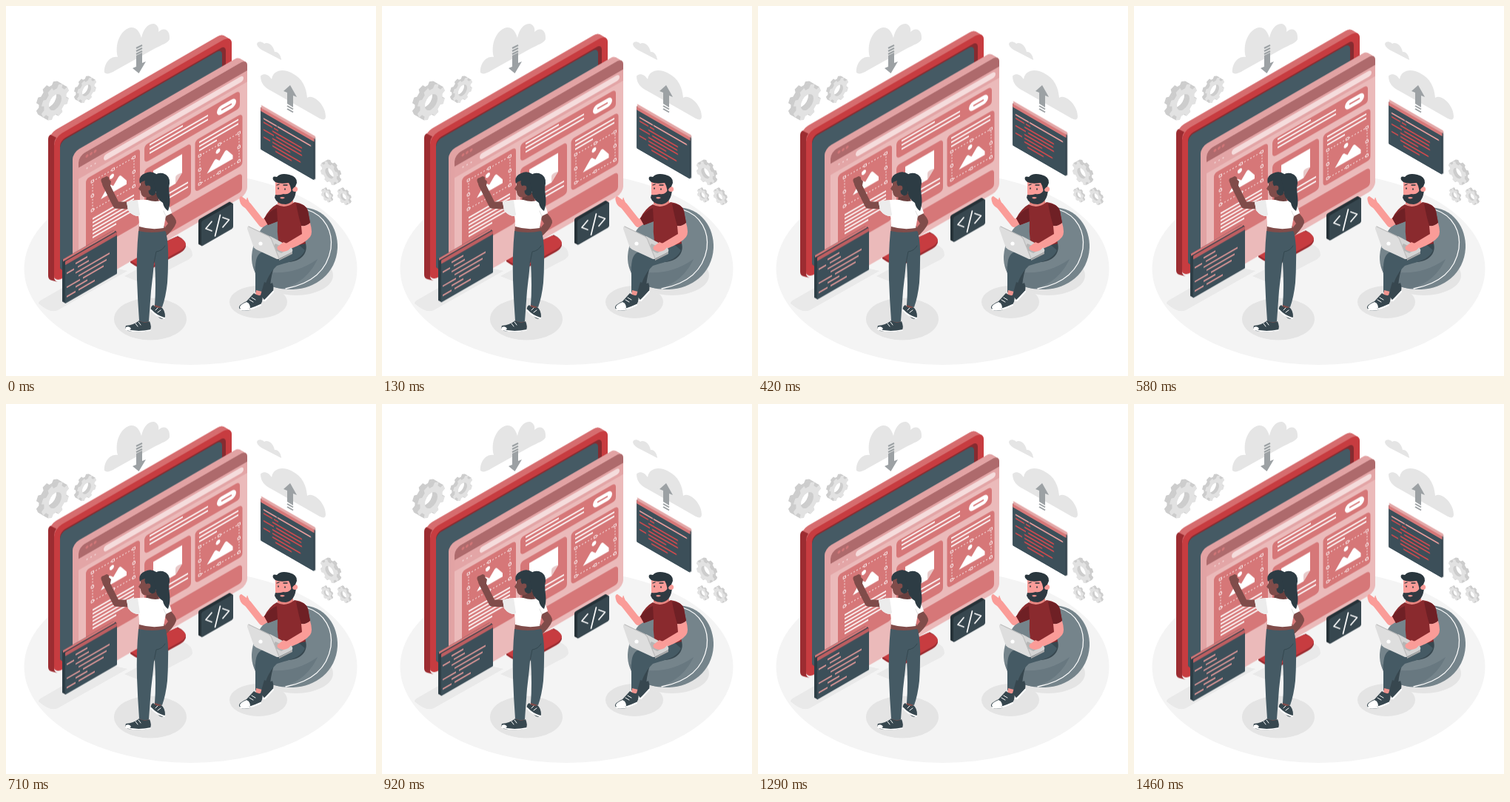
These frames come from a looping animation (500 by 500 pixels, 1.5 s). An HTML page:

```html
<!DOCTYPE html>
<html lang="en">
<head>
<meta charset="utf-8">
<title>Web builders</title>
<style>
html, body { margin: 0; width: 100%; height: 100%; overflow: hidden; background: #fff; }
svg { display: block; width: 100vw; height: 100vh; }
</style>
</head>
<body>
<svg id="stage" viewBox="0 0 500 500" fill="none" stroke-linecap="round" stroke-linejoin="round">
  <ellipse cx="249.500" cy="355" rx="225" ry="130" fill="#f4f4f4"/>
  <g fill="#e4e4e4">
    <path d="M44 402Q44 399 50 396L130 350L164 358L70 411Q60 416 44 402Z" fill="#e9e9e9"/>
    <path d="M160 365L240 322Q252 326 252 337Q250 342 240 346L185 375Z" fill="#e9e9e9"/>
    <ellipse cx="195" cy="423" rx="49" ry="28.500"/>
    <ellipse cx="341" cy="400" rx="39" ry="22"/>
    <ellipse cx="392" cy="364" rx="50" ry="27"/>
  </g>

  <g id="clouds" fill="#e5e5e5">
    <path d="M133 90C132 79 140 67 151 69C146 50 156 31 169 29C178 29 181 37 183 43C185 33 191 23 200 24C205 26 207 30 206 35C215 27 222 34 221 45C219 50 211 52 200 58L148 87Q137 94 133 90Z"/>
    <path d="M344 95C347 90 355 92 359 99C361 86 375 84 387 91C401 98 406 111 407 124C416 118 432 135 432 149Q432 156 424 152L359 115Q344 108 344 95Z"/>
    <path d="M339 51C341 47 346 48 349 51C353 48 361 52 363 62C368 61 372 68 372 73L345 59Q339 55 339 51Z"/>
  </g>
  <g fill="#9ca1a4">
    <path d="M176 67L184 63V77L189 75L179.500 91L171 84L176 82Z"/>
    <path d="M384 107L393 123L388 121V137L380 132V117L375 115Z"/>
  </g>
  <path d="M176 57L184 53M176 61L184 57M176 65L184 61M380 135L388 139.500M380 139L388 143.500" stroke="#9ca1a4" stroke-width="2" stroke-linecap="butt"/>
  <g id="gears"></g>
  <g id="float"></g>

  <g id="man">
    <path d="M398 272C432 272 449 300 448 327C446 362 418 382 388 383C352 384 331 366 332 338C334 305 362 272 398 272Z" fill="#75848b"/>
    <path d="M334 350C348 364 388 366 421 342C411 364 394 377 373 382C350 379 336 368 334 350Z" fill="#687880"/>
    <path d="M406 275C432 283 442 306 439 328C434 357 414 375 378 382" stroke="#fff" stroke-width="1.300"/>

    <path d="M404 318C410 332 400 345 382 346L364 349Q358 362 357 380L347 379C345 362 340 350 347 340L372 326Z" fill="#37474f"/>
    <path d="M390 318L345 333C336 338 337 352 337 364L337 387L347 389C350 376 354 362 366 351C384 345 398 344 404 330Z" fill="#455a64"/>
    <path d="M338 384L346 386L344 394L337 392ZM350 376L357 378L356 384L349 382Z" fill="#f0938e"/>
    <path d="M349 373Q356 377 360 374Q363 382 360 387L349 397L344 391Z" fill="#37474f"/>
    <path d="M361 386L350 398L346 398" stroke="#fff" stroke-width="2"/>
    <path d="M335 388Q341 393 346 390Q348 400 343 404L329 411Q318 414 315 408Q314 404 325 399Z" fill="#37474f"/>
    <path d="M325 400Q330 402 330 408Q320 413 316 408Q315 404 325 400Z" fill="#fff"/>
    <path d="M317 410Q325 413 344 404" stroke="#fff" stroke-width="2"/>
    <path d="M329 397L334 400M332 394L337 397" stroke="#fff" stroke-width="1"/>

    <path d="M366 281L346 294L327 270" stroke="#fa9c98" stroke-width="9.500"/>
    <path d="M331 270L327 261Q326 256 325 262L318 257Q314 258 316 264Q317 270 325 274Z" fill="#fa9c98"/>
    <path d="M367 256L386 256L389 268Q377 276 367 268Z" fill="#e88580"/>
    <path d="M366 268Q377 275 390 265Q405 267 408 277L411 293Q405 298 399 297L405 321Q385 327 368 318Q366 305 367 291L354 296L349 287Q356 273 366 268Z" fill="#8a2a2e"/>
    <path d="M392 267Q405 267 408 277L411 293Q405 298 399 297Q395 284 392 267ZM366 273L367 291L354 296L349 287Q357 276 366 273Z" fill="#6f2025"/>
    <path d="M399 297Q406 298 411 293Q415 307 411 312Q405 320 385 328L375 333Q366 331 366 326L380 320L400 308Z" fill="#fa9c98"/>
    <path d="M364 236Q374 228 388 237L389 255Q385 266 374 266Q365 264 364 254Z" fill="#fa9c98"/>
    <path d="M364 255Q369 256 375 254Q384 256 387 246L392 248Q391 266 378 268Q366 268 363 259Z" fill="#2f3a42"/>
    <path d="M370 259Q373 257 377 259Q373 262 370 259Z" fill="#f0938e"/>
    <circle cx="390.500" cy="247.500" r="3.600" fill="#fa9c98"/>
    <path d="M361 235Q359 229 366 231Q371 225 383 228Q394 231 393 239L391 244Q387 246 386 251L384 243L382 239Q370 241 364 238Z" fill="#2a373e"/>
    <path d="M366 242L369 241M375 242L380 242" stroke="#263238" stroke-width="1.300"/>
    <path d="M368 246v1M377 247v1" stroke="#263238" stroke-width="1.600"/>

    <path d="M357 311L385 326Q389 330 386 333L368 342L334 326Z" fill="#d4d4d4"/>
    <path d="M364 321L381 329L372 334L360 328Z" fill="#b5b5b5"/>
    <path d="M369 342L387 332V335L369 344Z" fill="#a9a9a9"/>
    <path d="M375 319L386 324Q384 331 374 332Q364 330 367 325Z" fill="#fa9c98"/>
    <path d="M328 298L355 311Q358 313 359 316L369 341Q367 343 364 341L338 329Q335 327 334 324L326 301Q326 297 328 298Z" fill="#dedede"/>
    <path d="M328 298L355 311Q358 313 359 316L369 341" stroke="#bdbdbd" stroke-width="1.200"/>
    <circle cx="344" cy="321" r="2.600" fill="#fff"/>
  </g>

  <g id="woman">
    <path d="M219 276Q231 287 230 293Q227 302 213 314L207 309L219 294L212 283Z" fill="#804c4a"/>
    <path d="M201 403L210 406L207 414L200 411Z" fill="#804c4a"/>
    <path d="M199 404Q204 410 210 407Q215 411 215 420Q213 424 208 422L196 411Q195 406 199 404Z" fill="#37474f"/>
    <path d="M196 411Q203 419 214 422" stroke="#fff" stroke-width="2"/>
    <path d="M202 411L205 408M205 414L209 411" stroke="#fff" stroke-width="1"/>
    <path d="M181 421H193L192 431H181Z" fill="#804c4a"/>
    <path d="M180 425Q187 430 194 426Q197 433 195 438Q183 442 165 439Q160 436 162 432Q173 431 180 425Z" fill="#37474f"/>
    <path d="M162 437Q176 442 195 438" stroke="#fff" stroke-width="1.600"/>
    <path d="M162 434Q167 432 169 436L167 438L162 437Z" fill="#fff"/>
    <path d="M175 429L178 433M179 427L182 431" stroke="#fff" stroke-width="1"/>
    <path d="M180 295L214 297L216 309L179 308Z" fill="#804c4a"/>
    <path d="M190 308L216 305Q220 322 219 347Q219 360 218 374Q216 393 211 407L201 404Q203 380 201 345Z" fill="#455a64"/>
    <path d="M179 304Q197 308 215 304Q219 318 217 333L201 338Q199 360 196 385L193 426Q187 429 180 425Q178 399 177 370Q176 335 179 304Z" fill="#455a64"/>
    <path d="M215 324Q211 331 203 332L200 347" stroke="#344850" stroke-width="1"/>
    <path d="M190 252L205 252L207 267H189Z" fill="#6a403f"/>
    <path d="M176 270L149 269L135 241" stroke="#804c4a" stroke-width="9.500"/>
    <path d="M129 238Q127 233 132 232L136 230Q140 231 139 234L142 237Q141 243 140 246L133 247Z" fill="#804c4a"/>
    <path d="M163 265Q176 261 191 262Q203 266 211 262Q221 266 224 280L216 284L213 300Q196 303 180 298Q180 289 179 284Q171 284 165 276Z" fill="#fff"/>
    <path d="M163 265Q171 262 178 263L181 282L179 284Q171 284 165 276Z" fill="#ececec"/>
    <path d="M216 284L213 277" stroke="#dedede" stroke-width="1"/>
    <path d="M182 237Q190 229 198 235L199 253Q196 260 186 258Q182 255 182 250L179 247L182 242Z" fill="#804c4a"/>
    <path d="M181 240Q178 230 188 226Q196 222 203 227Q208 235 205 245L201 255Q196 258 193 253L192 246Q186 241 188 236Q183 237 181 240Z" fill="#2d3c44"/>
    <circle cx="192" cy="246" r="3.400" fill="#804c4a"/>
    <path d="M199 233Q202 224 212 226Q222 229 221 240C218 252 225 262 219 277Q213 273 212 266Q202 260 202 247Z" fill="#2d3c44"/>
  </g>
</svg>
<script>
const $ = id => document.getElementById(id);
const RED = '#c73c40', CARD = '#d67778', DARK = '#3c4f59';

const rect = (x, y, w, h, r, fill) =>
  `<rect x="${x}" y="${y}" width="${w}" height="${h}" rx="${r}" fill="${fill}"/>`;
const line = (x, y, w, color = '#fff', width = 2) =>
  `<path d="M${x} ${y}h${w}" stroke="${color}" stroke-width="${width}" stroke-linecap="butt"/>`;
// Wall planes: x stays on screen, y is sheared along x.
const leftWall = s => `<g transform="matrix(1 -.577 0 1 0 56.500)">${s}</g>`;
const rightWall = s => `<g transform="matrix(1 .577 0 1 0 -198.500)">${s}</g>`;

function slab(x, y, w, h, r, front, side, depth, dir = -1) {
  let s = '';
  for (let d = depth; d > 0; d -= .5) s += rect(x + dir * d, y - 1.15 * d, w, h, r, side);
  return s + rect(x, y, w, h, r, front);
}

function picture(x, y, w, h) {
  let s = `<rect x="${x}" y="${y}" width="${w}" height="${h}" stroke="#fff" stroke-width=".8" stroke-dasharray="2 2" stroke-linecap="butt"/>`;
  for (let i = 0; i < 9; i++) {
    if (i === 4) continue;
    s += `<rect x="${x + w * (i % 3) / 2 - 1.500}" y="${y + h * (i / 3 | 0) / 2 - 1.500}" width="3" height="3" fill="${CARD}" stroke="#fff" stroke-width=".7"/>`;
  }
  const cx = x + w / 2, cy = y + h / 2;
  return s + `<circle cx="${cx - 2}" cy="${cy - 11}" r="3" fill="#fff"/>
    <path d="M${cx - 17} ${cy + 11}L${cx - 7} ${cy - 1}Q${cx - 5} ${cy - 3} ${cx - 3} ${cy}L${cx} ${cy + 3}L${cx + 7} ${cy - 5}Q${cx + 9} ${cy - 7} ${cx + 11} ${cy - 4}L${cx + 18} ${cy + 6}V${cy + 11}Z" fill="#fff"/>`;
}

function gear(cx, cy, R, dir, depth) {
  const teeth = 8, pts = [];
  for (let i = 0; i < teeth; i++)
    [[-.3, .8], [-.2, 1], [.2, 1], [.3, .8]].forEach(([o, k]) => {
      const a = (i + o) / teeth * 2 * Math.PI + .4;
      pts.push([R * k * Math.cos(a), R * k * Math.sin(a)].map(n => n.toFixed(1)));
    });
  const h = R * .45;
  const d = `M${pts.join('L')}ZM${h} 0A${h} ${h} 0 1 0 ${-h} 0A${h} ${h} 0 1 0 ${h} 0Z`;
  let s = '';
  for (let k = depth; k >= 0; k -= .5)
    s += `<path d="${d}" fill-rule="evenodd" fill="${k ? '#cdcdcd' : '#e2e2e2'}" transform="matrix(.866 ${.5 * dir} 0 1 ${cx + dir * k} ${cy - .577 * k})"/>`;
  return s;
}

function monitor() {
  const stand = `<path d="M168 342L232 311Q243 316 243 325Q242 330 235 334L197 355Q184 359 168 347Z" fill="#9c2c31"/>
    <path d="M168 339L230 312Q242 315 243 322Q242 327 235 331L197 352Q184 356 168 344Z" fill="${RED}"/>`;
  return stand
    + leftWall(slab(65, 159, 240, 196.500, 11, RED, '#d66d6f', 8))
    + '<path d="M57 180Q57 176 60 174L68 178Q65 182 65 187V368Q66 372 70 373L62 371Q57 370 57 365Z" fill="#9c2c31"/>'
    + leftWall(rect(73, 168, 224, 177, 7, '#862b30') + rect(73, 170, 219, 175, 7, '#455a64'));
}

function browser() {
  const clip = '<clipPath id="page"><rect x="98" y="203" width="228" height="183" rx="9"/></clipPath>';
  let s = clip + slab(98, 203, 228, 183, 9, '#ebbaba', '#e2a3a4', 8);
  s += `<g clip-path="url(#page)">${rect(98, 203, 228, 16, 0, '#ae6a6c')}${rect(98, 219, 228, 15, 0, '#e3a5a6')}</g>`;
  for (const x of [109.5, 115, 120.500])
    s += `<circle cx="${x}" cy="209.500" r="2" fill="#d07678"/><circle cx="${x}" cy="226" r="1" fill="#f3d5d5"/>`;
  s += rect(132, 222, 189, 8, 4, '#f5dcdc');

  s += rect(108, 240, 73, 102, 5, CARD) + rect(187, 240, 129, 24, 5, CARD)
    + rect(187, 273, 63, 70, 5, CARD) + rect(255.500, 273, 64, 70, 5, CARD)
    + rect(187, 353, 132, 25, 5, CARD);

  s += picture(117, 248, 56, 39);
  for (let i = 0; i < 6; i++) s += line(117, 299 + i * 5, i === 5 ? 32 : 56);
  s += line(194, 243.500, 45) + line(194, 249, 79) + line(194, 254.500, 79);
  s += rect(285, 246, 26, 12, 6, '#fff') + line(291, 252, 14, CARD, 2);

  s += '<path d="M199 281H238V306L229 316H199Z" fill="#fff"/><path d="M238 306L229 316V308Q229 305 232 305Z" fill="#e8c9c9"/>';
  s += line(196, 324, 50) + line(196, 330, 50);
  s += line(261, 278.500, 53) + line(261, 284, 53) + line(261, 289.500, 24);
  s += picture(262, 297, 53, 38);
  return leftWall(s);
}

function panels() {
  const pink = '#e39a9a', red = '#c94a4d';
  const small = [[94, 0, 16], [82, 1, 10], [97, 1, 15], [94, 2, 46], [98, 3, 38], [82, 4, 18],
    [104, 4, 28], [94, 5, 16], [82, 6, 12], [98, 6, 22]];
  let s = slab(80, 335, 70, 57, 1, DARK, '#2f3e47', 4) + rect(80, 335, 70, 5, 1, '#bd5e61')
    + line(77, 332, 70, CARD, 3);
  for (const [x, row, w] of small) s += line(x, 346 + row * 6.3, w, pink, 1.900);

  s += slab(264, 387, 43, 34, 2, '#37474f', '#263238', 4);
  s = leftWall(s) + '<path d="M278 291.500L270 301L278 304M289.500 282.500L282.500 311M293 286L301.500 289L293 299" stroke="#fff" stroke-width="1.700"/>';

  const code = [[348, 0, 18], [367, 0, 45], [348, 1, 12], [362, 1, 6], [360, 2, 40], [348, 3, 14], [365, 3, 34],
    [360, 4, 40], [348, 5, 9], [360, 5, 24], [360, 6, 38], [364, 7, 22]];
  let r = slab(344, 137, 72, 57, 1, DARK, '#2f3e47', 2, 1) + rect(344, 137, 72.500, 5, 1, CARD)
    + line(345, 135.500, 73, '#e3a8a8', 4);
  for (const [x, row, w] of code) r += line(x, 150 + row * 5, w, row < 1 ? pink : red, 1.900);
  return s + rightWall(r);
}

$('gears').innerHTML = gear(66.500, 130, 22, -1, 7) + gear(109, 114, 15.500, -1, 4)
  + gear(437, 226, 14.500, 1, 4) + gear(433, 256, 8.500, 1, 2) + gear(456, 258, 10, 1, 2.500);
$('float').innerHTML = monitor() + browser() + panels();

$('float').animate(
  [0, -10, 0].map(y => ({ transform: `translateY(${y}px)` })),
  { duration: 1500, iterations: Infinity, easing: 'linear' }
);
</script>
</body>
</html>
```
